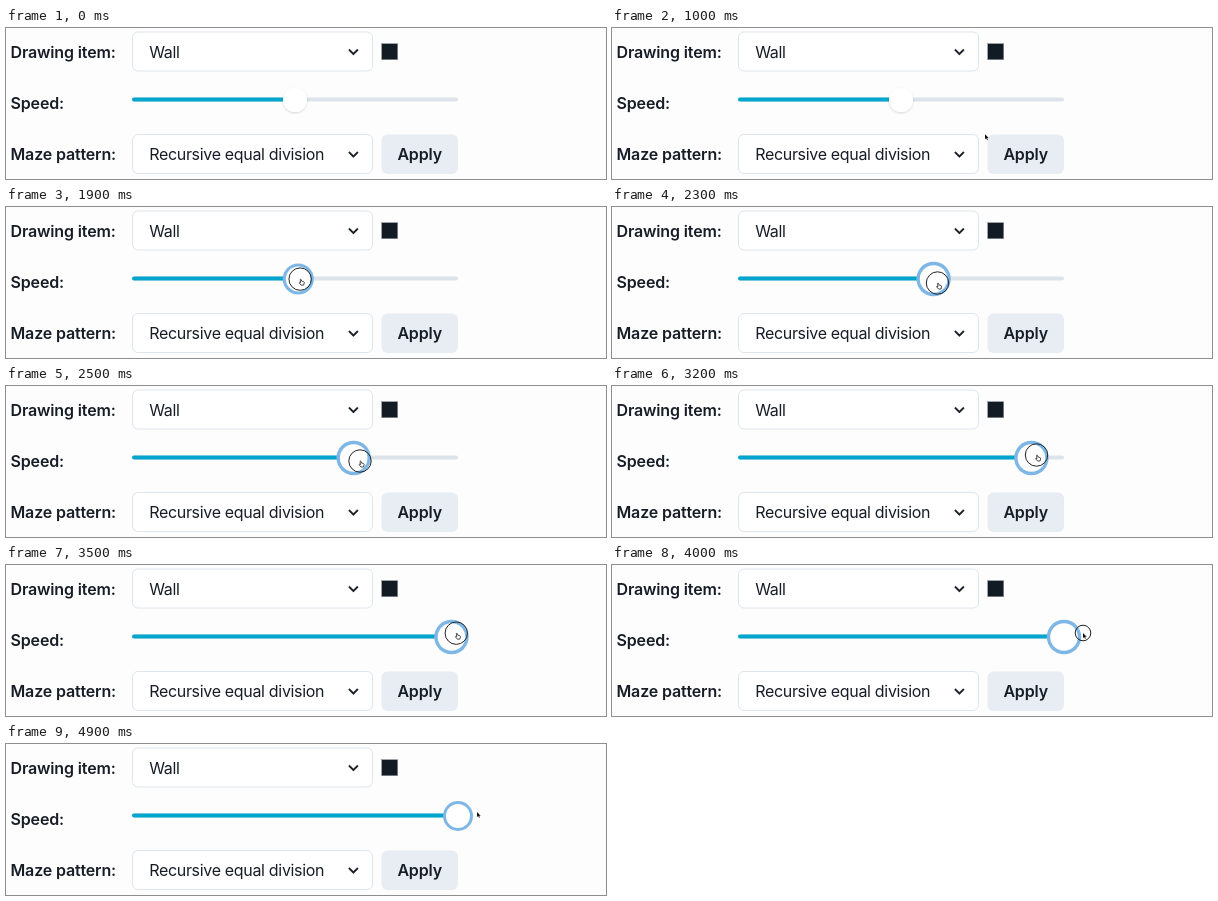
These frames come from a looping animation (600 by 151 pixels, 6300 ms). An HTML page:

```html
<!DOCTYPE html>
<html lang="en">
<head>
<meta charset="utf-8">
<title>Maze controls</title>
<style>
  html, body { margin: 0; width: 100%; height: 100%; overflow: hidden; background: #fdfdfd; }
  svg { display: block; }
  text { font: 400 16px Inter, "Open Sans", sans-serif; letter-spacing: -.02em; fill: #171d27; }
  .bold { font-weight: 600; letter-spacing: -.009em; }
  .box { fill: #fff; stroke: #dfe5ec; }
</style>
</head>
<body>
<svg width="600" height="151" viewBox="0 0 600 151">
  <defs>
    <path id="chevron" d="M16.59 8.59L12 13.17 7.41 8.59 6 10l6 6 6-6z" transform="scale(.8333)" fill="#171d27" stroke="#171d27" stroke-width=".3"/>
    <filter id="shadow" x="-30%" y="-30%" width="160%" height="160%">
      <feDropShadow dx="0" dy="1" stdDeviation="1.3" flood-opacity=".17"/>
    </filter>
  </defs>

  <text class="bold" x="4.5" y="29.5">Drawing item:</text>
  <text class="bold" x="4.5" y="80.5">Speed:</text>
  <text class="bold" x="4.5" y="132">Maze pattern:</text>

  <rect class="box" x="126.5" y="4" width="240" height="39" rx="5.5"/>
  <text x="143.2" y="29.5">Wall</text>
  <use href="#chevron" x="337.4" y="13.8"/>
  <rect x="375.7" y="15.7" width="16" height="16" fill="#121a23" stroke="#8a9097" stroke-width=".5"/>

  <rect class="box" x="126.5" y="106.5" width="240" height="39" rx="5.5"/>
  <text x="143.2" y="132">Recursive equal division</text>
  <use href="#chevron" x="337.4" y="116.3"/>
  <rect x="375.5" y="106.5" width="76.5" height="39.5" rx="6" fill="#e8edf4"/>
  <text class="bold" x="413.7" y="132" text-anchor="middle">Apply</text>

  <rect x="126" y="69.6" width="326" height="4" rx="2" fill="#dde3ea"/>
  <rect id="fill" x="126" y="69.6" height="4" rx="2" fill="#00a5ce"/>
  <g id="thumb">
    <circle id="ring" r="15" fill="#7eb6e6"/>
    <circle id="knob" r="12" fill="#fff"/>
  </g>

  <g id="cursor">
    <circle id="halo" fill="none" stroke="#222"/>
    <path id="arrow" d="M0 0V5L1.2 4 2 5.8 2.9 5.4 2.1 3.7H3.7Z" fill="#111" stroke="#fff" stroke-width=".5" paint-order="stroke"/>
    <path id="hand" d="M0 .4Q.7-.2 1.1.5L1.5 2 3.5 2.5Q4.3 2.8 4.1 3.8L3.5 6H1L-1 3.6Q-.9 2.8.5 3.6Z" fill="#fff" stroke="#222" stroke-width=".8"/>
  </g>
</svg>
<script>
const LOOP = 6300, STEP = 100;
const APPROACH = 400, PRESS = 1850, RELEASE = 4500, LAG = 45;
const TRACK = { x: 126, y: 72, width: 326 };

// The hand-drawn drag: time and cursor position.
const drag = [
  { t: PRESS, x: 293.5, y: 72 },
  { t: 2300, x: 325.5, y: 76 },
  { t: 2500, x: 354, y: 75 },
  { t: 2800, x: 387, y: 73 },
  { t: 3200, x: 424.5, y: 69 },
  { t: 3900, x: 471, y: 68 },
];

const el = id => document.getElementById(id);
const show = (node, on) => node.setAttribute("visibility", on ? "visible" : "hidden");
const ramp = (t, from, to) => Math.min(1, Math.max(0, (t - from) / (to - from)));

// Smooth curve through the drag points, at rest at both ends.
function along(axis, t) {
  const last = drag.length - 1;
  const i = Math.max(0, Math.min(last - 1, drag.findLastIndex(p => p.t <= t)));
  const slope = k => k === 0 || k === last ? 0
    : (drag[k + 1][axis] - drag[k - 1][axis]) / (drag[k + 1].t - drag[k - 1].t);
  const a = drag[i], b = drag[i + 1], span = b.t - a.t, u = ramp(t, a.t, b.t);
  return a[axis] + (b[axis] - a[axis]) * u * u * (3 - 2 * u)
    + span * u * (1 - u) * (slope(i) * (1 - u) - slope(i + 1) * u);
}

function cursorAt(t) {
  if (t >= PRESS) return { x: along("x", t), y: along("y", t) };
  const left = 1 - ramp(t, APPROACH, 1800);
  return { x: drag[0].x + 243.5 * left * left, y: drag[0].y + 60 * left };
}

// The thumb trails the cursor and snaps to whole percents.
function thumbAt(t) {
  const part = t < PRESS ? .5 : (cursorAt(t - LAG).x - TRACK.x) / TRACK.width;
  return TRACK.x + TRACK.width * Math.min(1, Math.round(part * 100) / 100);
}

function draw(now) {
  const t = Math.floor(now % LOOP / STEP) * STEP;
  const { x, y } = cursorAt(t), thumb = thumbAt(t);
  const focused = t >= PRESS;
  const over = Math.hypot(x - thumb, y - TRACK.y) < 17;
  const grow = ramp(t, PRESS, PRESS + 200) - ramp(t, RELEASE, RELEASE + 200);

  el("fill").setAttribute("width", thumb - TRACK.x);
  el("thumb").setAttribute("transform", `translate(${thumb} ${TRACK.y}) scale(${1 + .15 * grow})`);
  show(el("ring"), focused);
  el("knob").setAttribute("filter", focused ? "none" : "url(#shadow)");

  el("cursor").setAttribute("transform", `translate(${x} ${y})`);
  el("cursor").setAttribute("display", t >= STEP ? "inline" : "none");
  el("halo").setAttribute("r", over ? 11.2 : 7.8);
  el("halo").setAttribute("opacity", ramp(t, 1600, 1800) - ramp(t, RELEASE, RELEASE + 400));
  show(el("hand"), over);
  show(el("arrow"), !over);
}

function tick() {
  draw(performance.now());
  requestAnimationFrame(tick);
}
tick();
</script>
</body>
</html>
```
